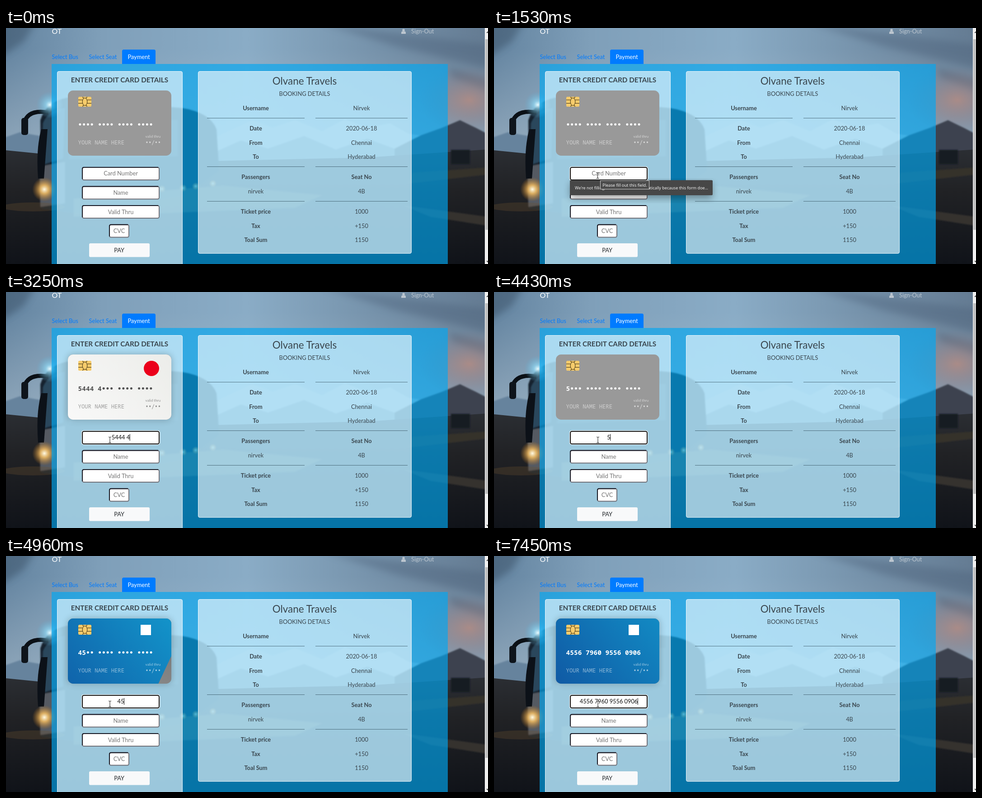
These frames come from a looping animation (1067 by 525 pixels, 8 s). An HTML page:

```html
<!DOCTYPE html>
<html lang="en">
<head>
<meta charset="utf-8">
<title>Payment</title>
<style>
  html, body { margin: 0; width: 100%; height: 100%; overflow: hidden; background: #1a1e25; }
  svg { display: block; width: 1067px; height: 525px; }
  text { font: 12.8px Lato, sans-serif; fill: #3a464e; }
  .mid { text-anchor: middle; }
  .bold { font-weight: 700; }
  .hint { fill: #757575; }
  .mono { font-family: "Noto Sans Mono", "DejaVu Sans Mono", monospace; }
  .dots { font-family: "DejaVu Sans Mono", monospace; }
  .ui { font-family: "Open Sans", sans-serif; fill: #fff; }
</style>
</head>
<body>
<svg viewBox="0 0 1067 525" xmlns="http://www.w3.org/2000/svg">
  <defs>
    <linearGradient id="sky">
      <stop offset="0" stop-color="#6484a0"/>
      <stop offset=".2" stop-color="#7f9fb9"/>
      <stop offset=".5" stop-color="#8aacc6"/>
      <stop offset="1" stop-color="#647b92"/>
    </linearGradient>
    <linearGradient id="haze" x2="0" y2="1">
      <stop offset=".15" stop-color="#b4c4d0" stop-opacity="0"/>
      <stop offset="1" stop-color="#b4c4d0" stop-opacity=".6"/>
    </linearGradient>
    <linearGradient id="land" x2="0" y2="1">
      <stop offset="0" stop-color="#2b2e33"/>
      <stop offset=".35" stop-color="#212225"/>
      <stop offset="1" stop-color="#101319"/>
    </linearGradient>
    <radialGradient id="dusk"><stop stop-color="#b58a80" stop-opacity=".8"/><stop offset="1" stop-color="#8a7680" stop-opacity="0"/></radialGradient>
    <radialGradient id="warm"><stop stop-color="#fffbe6"/><stop offset=".35" stop-color="#f3bd62" stop-opacity=".85"/><stop offset="1" stop-color="#c07820" stop-opacity="0"/></radialGradient>
    <radialGradient id="cool"><stop stop-color="#e8fbff"/><stop offset=".3" stop-color="#8fd8f4" stop-opacity=".7"/><stop offset="1" stop-color="#5ab0d8" stop-opacity="0"/></radialGradient>
    <linearGradient id="base" gradientUnits="userSpaceOnUse" x1="66.5" y1="176" x2="162.5" y2="-31">
      <stop stop-color="#939393"/><stop offset="1" stop-color="#717171"/>
    </linearGradient>
    <linearGradient id="silver" gradientUnits="userSpaceOnUse" x1="-86" y1="185" x2="86" y2="-185">
      <stop stop-color="#fbfbfb"/><stop offset="1" stop-color="#e8e9e5"/>
    </linearGradient>
    <linearGradient id="blue" gradientUnits="userSpaceOnUse" x1="-86" y1="185" x2="86" y2="-185">
      <stop stop-color="#0f509e"/><stop offset="1" stop-color="#1399cd"/>
    </linearGradient>
    <clipPath id="cardClip"><rect width="229" height="145" rx="11.6"/></clipPath>
    <filter id="soft" x="-30%" y="-30%" width="160%" height="160%"><feGaussianBlur stdDeviation="8"/></filter>
    <filter id="blur2" x="-10%" y="-10%" width="120%" height="120%"><feGaussianBlur stdDeviation="1.5"/></filter>
  </defs>

  <!-- scenery -->
  <rect width="1067" height="300" fill="url(#sky)"/>
  <rect width="1067" height="300" fill="url(#haze)"/>
  <g filter="url(#soft)" opacity=".4">
    <path d="M-20 -20H70L40 30-20 70Z" fill="#2f4256"/>
    <path d="M700 -10 1090 40V95L860 40Z" fill="#4c6179"/>
    <path d="M980 90 1090 120V150L990 112Z" fill="#46586c"/>
  </g>
  <ellipse cx="1025" cy="160" rx="110" ry="75" fill="url(#dusk)"/>
  <g filter="url(#blur2)">
    <path d="M-10 246 30 232 75 240 110 225V300H-10Z" fill="#66839d"/>
    <path d="M430 262 480 235 545 205 590 222 640 205 700 230 750 203 800 222 850 212 890 235 1067 262V310H430Z" fill="#b4c2cd"/>
    <path d="M430 290 520 250 580 268 660 240 730 270 800 246 870 272V312H430Z" fill="#7c8c9c"/>
    <path d="M860 268 915 240 965 222 1005 205 1040 222 1075 240V310H860Z" fill="#3e434f"/>
  </g>
  <path d="M0 272 120 284 460 296 800 288 1067 270V525H0Z" fill="url(#land)"/>
  <g filter="url(#blur2)">
    <path d="M985 271H1027V303H985Z" fill="#171a20"/>
    <path d="M900 322 1067 310V326L890 346Z" fill="#353029"/>
    <path d="M880 395 1067 420V440L940 420Z" fill="#36322f"/>
    <path d="M76 205Q88 165 135 155L390 178Q452 188 466 225L472 318 400 372 160 412 78 402Z" fill="#18222e"/>
    <path d="M82 212Q92 185 130 178L126 290 78 305Z" fill="#29465c"/>
    <path d="M74 308 130 298V390L76 398Z" fill="#545a62"/>
    <path d="M140 200 380 205V285L140 292Z" fill="#2b3b4a"/>
    <path d="M150 380 480 350 700 372 640 400 150 420Z" fill="#54503c" opacity=".7"/>
  </g>
  <path d="M94 188Q48 180 40 212" fill="none" stroke="#0b1016" stroke-width="9"/>
  <rect x="34" y="200" width="15" height="38" rx="5" fill="#0e141b"/>
  <path d="M78 225Q66 270 71 335L84 335 92 225Z" fill="#0c1118"/>
  <circle cx="97" cy="171" r="30" fill="url(#cool)"/>
  <circle cx="85" cy="359" r="27" fill="url(#warm)"/>
  <g id="lamps" fill="url(#warm)"></g>
  <ellipse cx="60" cy="398" rx="70" ry="10" fill="#6b5230" opacity=".3"/>

  <!-- navigation -->
  <text x="101.5" y="13" style="font-size:16px;fill:#fff">OT</text>
  <g fill="#bcc6cf"><circle cx="880" cy="4.8" r="2.8"/><path d="M875 13V10.500Q875 7.500 878 7.300H882Q885 7.500 885 10.500V13Z"/></g>
  <text x="897" y="12" style="fill:#bcc6cf">Sign-Out</text>
  <rect x="101" y="80" width="877" height="445" fill="#00a8f3" opacity=".65"/>
  <path d="M257 80V51.500Q257 48 260.500 48H327.500Q331 48 331 51.500V80Z" fill="#007bff"/>
  <text x="101.500" y="69" style="fill:#007bff">Select Bus</text>
  <text x="183.500" y="69" style="fill:#007bff">Select Seat</text>
  <text x="294" y="69" class="mid" style="fill:#fff">Payment</text>

  <!-- panels -->
  <g fill="#fff" fill-opacity=".6" stroke="#fff" stroke-opacity=".85">
    <rect x="113.500" y="96.500" width="277" height="460" rx="3.500"/>
    <rect x="425.500" y="96.500" width="472" height="405" rx="3.500"/>
  </g>
  <text x="251.500" y="121" class="mid bold" style="font-size:15.3px">ENTER CREDIT CARD DETAILS</text>
  <text x="661" y="125.500" class="mid" style="font-size:22.4px">Olvane Travels</text>
  <text x="661" y="151" class="mid">BOOKING DETAILS</text>
  <g id="rows"></g>

  <!-- card -->
  <rect id="glow" x="137" y="139" width="229" height="145" rx="11.600" opacity=".25" filter="url(#soft)"/>
  <g transform="translate(137 139)">
    <g clip-path="url(#cardClip)">
      <rect id="face" width="229" height="145"/>
      <g id="sweep"><rect id="paint" x="-172" y="-145" width="344" height="290"/></g>
    </g>
    <g transform="translate(23 14)">
      <rect width="29" height="22" rx="2.500" fill="#f6cb6b"/>
      <path d="M0 7H9M0 14.500H9M20 7H29M20 14.500H29M10 0V2Q13 3 14.500 3T19 2V0M10 22V20Q13 19 14.500 19T19 20V22M12 3Q6 11 12 19M17 3Q23 11 17 19" fill="none" stroke="#33290f" stroke-width="1"/>
    </g>
    <circle id="disc" cx="185" cy="31" r="17" fill="#eb001b"/>
    <rect id="tile" x="161" y="14" width="23" height="23" fill="#fff"/>
    <g id="ink">
      <text class="mono bold" x="22.600" y="81" style="font-size:14.5px;fill:inherit"><tspan id="digits"></tspan><tspan id="rest" class="dots"></tspan></text>
      <text class="mono" x="22.600" y="120" style="font-size:12.2px;fill:inherit" opacity=".52">YOUR NAME HERE</text>
      <text x="188.500" y="105" text-anchor="middle" style="font-size:8.2px;fill:inherit" opacity=".6">valid thru</text>
      <text class="dots" x="171.500" y="120" style="font-size:11.4px;fill:inherit" opacity=".6">••/••</text>
    </g>
  </g>

  <!-- form -->
  <g id="fields"></g>
  <rect x="184" y="479" width="134" height="30.500" rx="3" fill="#f8f9fa"/>
  <text x="250.700" y="499" class="mid" style="fill:#212529">PAY</text>
  <g id="focus" fill="#fff">
    <rect x="167" y="308" width="174" height="32" rx="5"/>
    <rect x="169" y="310" width="170" height="28" rx="3.500" stroke="#101010" stroke-width="2"/>
  </g>
  <text id="hint" x="254" y="328.300" class="mid hint">Card Number</text>
  <text id="typed" x="254" y="328.300" class="mid" style="fill:#111"></text>
  <rect id="caret" y="316" width="1" height="15" fill="#111"/>

  <g id="popup">
    <rect x="169" y="345" width="314" height="34" opacity=".35" filter="url(#soft)"/>
    <rect x="168" y="338.500" width="316" height="33.500" rx="2" fill="#474747"/>
    <text x="326.500" y="359" class="ui mid" style="font-size:9.1px">We're not filling credit card info automatically because this form doe...</text>
  </g>
  <g id="tip">
    <rect x="235.500" y="339.500" width="108" height="19" fill="#4b4b4b" stroke="#d0d0d0"/>
    <text x="289.500" y="352.500" class="ui mid" style="font-size:9.2px">Please fill out this field.</text>
  </g>

  <!-- scrollbar -->
  <rect x="1060" width="7" height="525" fill="#f1f1f1"/>
  <rect x="1061" y="25" width="6" height="424" fill="#c1c1c1"/>
  <path d="M1063 11 1067 7V11ZM1063 518H1067V522Z" fill="#505050"/>

  <path id="arrow" d="M0 0V16L3.700 12.500 6.200 18.300 8.600 17.300 6.100 11.600H11.300Z" fill="#fff" stroke="#111" stroke-width=".9"/>
  <path id="beam" d="M-3-6.500Q0-6.500 0-5 0-6.500 3-6.500M0-5V5M-3 6.500Q0 6.500 0 5 0 6.500 3 6.500" fill="none" stroke="#2a2a2a" stroke-width="1.100"/>
</svg>
<script>
  const LOOP = 8000;
  const $ = id => document.getElementById(id);
  const show = (id, on) => { $(id).style.display = on ? '' : 'none'; };

  // Booking table: [y, left, right, bold left, bold right]
  const rows = [
    [178, 'Username', 'Nirvek', 1, 0],
    [223, 'Date', '2020-06-18', 1, 0],
    [255, 'From', 'Chennai', 1, 0],
    [286.5, 'To', 'Hyderabad', 1, 0],
    [331.5, 'Passengers', 'Seat No', 1, 1],
    [363.5, 'nirvek', '4B', 0, 0],
    [408.5, 'Ticket price', '1000', 1, 0],
    [440, 'Tax', '+150', 1, 0],
    [471.5, 'Toal Sum', '1150', 1, 0]
  ];
  const cell = (x, y, s, bold) =>
    `<text x="${x}" y="${y + 4.5}" class="mid${bold ? ' bold' : ''}">${s}</text>`;
  $('rows').innerHTML =
    rows.map(([y, a, b, ba, bb]) => cell(553, y, a, ba) + cell(787, y, b, bb)).join('') +
    [200.5, 308.5, 385.5].map(y =>
      `<path d="M445 ${y}H661M685 ${y}H889" stroke="#24404e" stroke-opacity=".65"/>`).join('');

  // Form fields: [x, y, width, placeholder]
  const fields = [[168, 309, 172, ''], [168, 351.5, 172, 'Name'], [168, 394, 172, 'Valid Thru'], [228, 436.5, 45, 'CVC']];
  const H = 30;
  $('fields').innerHTML = fields.map(([x, y, w, s]) => `
    <rect x="${x + 1}" y="${y + 1}" width="${w - 2}" height="${H - 2}" rx="3.5" fill="#fff" stroke="#707078" stroke-width="2"/>
    <path d="M${x + 1} ${y + H - 3}V${y + 4.5}Q${x + 1} ${y + 1} ${x + 4.5} ${y + 1}H${x + w - 3}" fill="none" stroke="#171722" stroke-width="2"/>
    <text x="${x + w / 2}" y="${y + 19.5}" class="mid hint">${s}</text>`).join('');

  $('lamps').innerHTML = [[300, 362], [345, 358], [392, 356], [420, 352], [458, 346]]
    .map(([x, y]) => `<circle cx="${x}" cy="${y}" r="9" opacity=".8"/>`).join('');

  // Typing
  const full = '4556 7960 9556 0906';
  const mask = '•••• •••• •••• ••••';
  const typing = [[0, ''], [1760, '5'], [2230, '54'], [2620, '544'], [2930, '5444'], [3180, '5444 4'],
    [3570, '5444 44'], [3880, '5444 4'], [4340, '544'], [4430, '5'], [4510, '']];
  const keyTimes = [4750, 4890, 5040, 5350, 5810, 6130,
    ...Array.from({ length: 7 }, (_, i) => 6360 + i * 78), 6980, 7300, 7450];
  keyTimes.forEach((t, i) => typing.push([t, full.slice(0, i + 1 + Math.floor(i / 4))]));

  const path = [[210, 0, 400], [440, 400, 440], [540, 597, 445], [670, 480, 420], [830, 290, 350], [980, 229.5, 328], [3180, 229.5, 328], [3250, 230, 329]];
  const brands = {
    silver: { start: 2230, time: 500, from: -1.7, ink: '#505050' },
    blue: { start: 4750, time: 390, from: -1.35, ink: '#fff' }
  };

  const at = (list, t) => list.filter(k => k[0] <= t).pop();
  const within = (t, a, b) => t >= a && t < b;

  // cubic-bezier(0, 0, .58, 1)
  function easeOut(x) {
    if (x <= 0) return 0;
    if (x >= 1) return 1;
    let lo = 0, hi = 1;
    for (let i = 0; i < 24; i++) {
      const s = (lo + hi) / 2;
      if (1.74 * s * s * (1 - s) + s * s * s < x) lo = s; else hi = s;
    }
    return 3 * lo * lo - 2 * lo * lo * lo;
  }

  function drawCursor(t) {
    const time = t < 980 ? 210 + Math.floor((t - 210) / 77) * 77 : t;
    const on = t >= 210;
    let [, x, y] = path[path.length - 1];
    const i = path.findIndex(p => p[0] > time);
    if (i > 0) {
      const [t0, x0, y0] = path[i - 1], [t1, x1, y1] = path[i];
      const k = (time - t0) / (t1 - t0);
      x = x0 + (x1 - x0) * k;
      y = y0 + (y1 - y0) * k;
    }
    const inField = fields.some(([fx, fy, w]) => within(x, fx, fx + w) && within(y, fy, fy + H));
    show('arrow', on && !inField);
    show('beam', on && inField);
    for (const id of ['arrow', 'beam']) $(id).setAttribute('transform', `translate(${x} ${y})`);
  }

  function drawCard(t, value) {
    const name = value.startsWith('54') ? 'silver' : value.startsWith('4') ? 'blue' : '';
    const brand = brands[name];
    $('digits').textContent = value;
    $('rest').textContent = mask.slice(value.length);
    $('ink').setAttribute('fill', brand ? brand.ink : '#fff');
    $('face').setAttribute('fill', brand ? 'url(#base)' : '#999');
    show('glow', brand);
    show('sweep', brand);
    show('disc', name === 'silver');
    show('tile', name === 'blue');
    if (!brand) return;
    const left = brand.from + (-0.22 - brand.from) * easeOut((t - brand.start) / brand.time);
    $('sweep').setAttribute('transform', `translate(${left * 229 + 172} 58) rotate(25)`);
    $('paint').setAttribute('fill', `url(#${name})`);
  }

  function draw(t) {
    const value = at(typing, t)[1];
    const focused = t >= 1070;
    drawCard(t, value);
    show('focus', focused);
    show('hint', !value);
    $('typed').textContent = value;
    $('caret').setAttribute('x', 253.5 + (value ? $('typed').getComputedTextLength() / 2 : 0));
    show('caret', focused && !within(t, 1530, 1760) && !within(t, 4110, 4340));
    show('popup', within(t, 1070, 1850) || within(t, 4510, 4750));
    show('tip', within(t, 1210, 1760));
    drawCursor(t);
  }

  const begin = performance.now();
  function tick() {
    draw((performance.now() - begin) % LOOP);
    requestAnimationFrame(tick);
  }
  tick();
</script>
</body>
</html>
```
